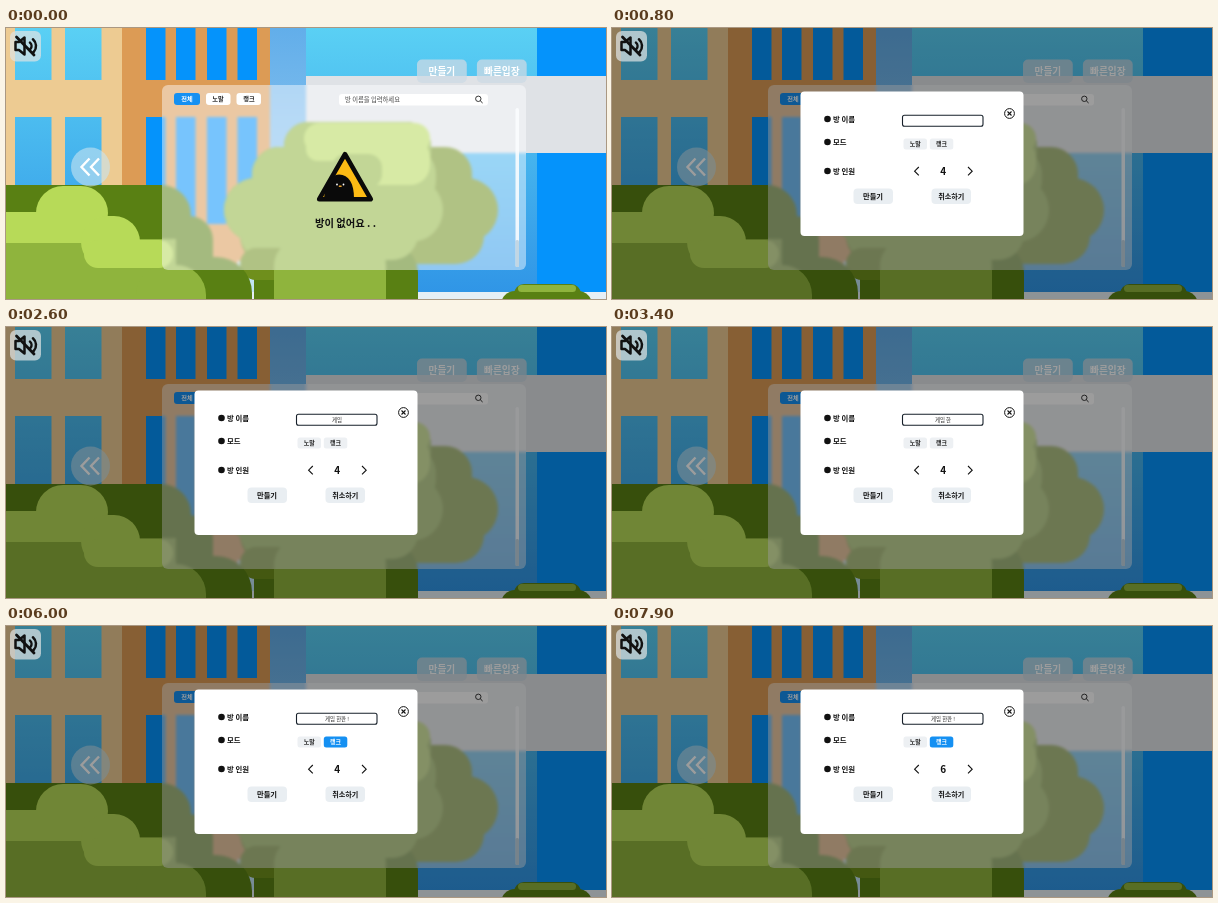
An HTML page with a canvas that plays this animation: 600 px wide and 271 px high, repeating every 8 s.

```html
<!DOCTYPE html>
<html lang="ko">
<head>
<meta charset="utf-8">
<title>방 만들기</title>
<style>
html, body { margin: 0; width: 100%; height: 100%; overflow: hidden; background: #fff; }
canvas { display: block; width: 600px; height: 271px; }
</style>
</head>
<body>
<canvas id="stage"></canvas>
<script>
const W = 600, H = 271, LOOP = 8000;
const HOVER_AT = 400, OPEN_AT = 800, TYPE_AT = 1780, KEY_MS = 190;
const RANK_AT = 5600, FIVE_AT = 6900, SIX_AT = 7400;
const STEPS = ['', 'ㄱ', '게', '겡', '게이', '게임', '게임 ', '게임 ㅎ', '게임 하', '게임 한',
  '게임 한ㅍ', '게임 한파', '게임 한판', '게임 한판 ', '게임 한판 !'];
const BLUE = '#0593fb', DARK = '#598013', OLIVE = '#6f8f1c', MID = '#8fb43d', LIGHT = '#b7da58';
const FONT = '"Noto Sans CJK KR", "Noto Sans KR", "Noto Sans CJK", sans-serif';
const dpr = window.devicePixelRatio || 1;

function prepare(canvas) {
  canvas.width = W * dpr;
  canvas.height = H * dpr;
  const c = canvas.getContext('2d');
  c.scale(dpr, dpr);
  return c;
}

const stage = document.getElementById('stage');
const ctx = prepare(stage);
const layer = () => document.createElement('canvas');

// Shapes take left, top, right, bottom.
function box(c, x, y, r, b, fill, rad = 0) {
  c.fillStyle = fill;
  c.beginPath();
  c.roundRect(x, y, r - x, b - y, rad);
  c.fill();
}

function disc(c, x, y, r, fill) {
  c.fillStyle = fill;
  c.beginPath();
  c.arc(x, y, r, 0, Math.PI * 2);
  c.fill();
}

function ring(c, x, y, r, color, width) {
  c.strokeStyle = color;
  c.lineWidth = width;
  c.beginPath();
  c.arc(x, y, r, 0, Math.PI * 2);
  c.stroke();
}

function line(c, pts, color, width) {
  c.strokeStyle = color;
  c.lineWidth = width;
  c.beginPath();
  pts.forEach(([x, y], i) => i ? c.lineTo(x, y) : c.moveTo(x, y));
  c.stroke();
}

function text(c, str, x, y, size, color, weight = 700, align = 'center') {
  c.font = `${weight} ${size}px ${FONT}`;
  c.textAlign = align;
  c.fillStyle = color;
  c.fillText(str, x, y + size * 0.36);
}

function fade(c, y0, y1, from, to) {
  const g = c.createLinearGradient(0, y0, 0, y1);
  g.addColorStop(0, from);
  g.addColorStop(1, to);
  return g;
}

function drawBuildings(c) {
  const sky = fade(c, 0, H, '#5ad0f4', '#2f94e6');
  box(c, 0, 0, W, H, sky);
  box(c, 0, 0, 116, H, '#edcb92');
  box(c, 116, 0, 264, H, '#dc9b55');
  for (const x of [9, 59]) {
    box(c, x, 0, x + 36.5, 52, sky);
    box(c, x, 89, x + 36.5, 170, sky);
  }
  for (const x of [140, 170, 201, 231.5]) {
    box(c, x, 0, x + 19.5, 52, BLUE);
    box(c, x, 89, x + 19.5, 196, BLUE);
    box(c, x, 233, x + 19.5, H, '#c2e4f5');
  }
  box(c, 264, 0, 300, H, fade(c, 0, H, '#62aeea', '#a9d4f2'));
  box(c, 531, 0, W, H, BLUE);
  box(c, 300, 48, W, 125, '#dfe2e6');
  box(c, 228, 264, W, H, '#e6eff5');
}

function drawTree(c) {
  box(c, 278, 94, 425, 150, OLIVE, 24);
  box(c, 246, 119, 466, 190, OLIVE, 27);
  box(c, 218, 150, 492, 214, OLIVE, 32);
  box(c, 234, 180, 478, 236, OLIVE, 28);
  box(c, 248, 215, 412, 300, DARK, 30);
  box(c, 278, 94, 425, 150, MID, 24);
  box(c, 246, 119, 430, 180, MID, 27);
  box(c, 218, 150, 437, 214, MID, 32);
  box(c, 234, 180, 412, 232, MID, 26);
  box(c, 234, 220, 311, 252, OLIVE, 16);
  box(c, 268, 210, 380, 300, MID, 28);
  box(c, 298, 95, 424, 126, LIGHT, 16);
  box(c, 300, 108, 352, 133, LIGHT, 12);
  box(c, 345, 110, 424, 157, LIGHT, 20);
  box(c, 326, 126, 376, 160, MID, 14);
}

function drawBushes(c) {
  box(c, 0, 157, 185, H, DARK, [0, 30, 0, 0]);
  box(c, 130, 188, 207, H, DARK, [0, 24, 0, 0]);
  box(c, 150, 229, 246, 310, DARK, 36);
  box(c, 0, 211, 170, H, MID);
  box(c, 130, 237, 200, 300, MID, 30);
  box(c, 30, 158, 102, 212, LIGHT, 28);
  box(c, 0, 184, 100, 215, LIGHT, [0, 0, 0, 0]);
  box(c, 75, 188, 134, 240, LIGHT, 26);
  box(c, 78, 212, 167, 240, LIGHT, 14);
  box(c, 495, 263, 586, 300, DARK, 14);
  box(c, 508, 256, 575, 290, DARK, 10);
  box(c, 512, 257, 570, 264, MID, 4);
}

function drawWarning(c) {
  c.lineJoin = 'round';
  c.beginPath();
  c.moveTo(339, 126.2);
  c.lineTo(364.8, 171.2);
  c.lineTo(313.2, 171.2);
  c.closePath();
  c.fillStyle = '#fdbb14';
  c.fill();
  c.strokeStyle = '#0a0a0a';
  c.lineWidth = 4.6;
  c.stroke();
  c.lineJoin = 'miter';
  c.fillStyle = '#0a0a0a';
  c.beginPath();
  c.moveTo(318, 171);
  c.bezierCurveTo(319, 156, 324, 147, 333, 146.5);
  c.bezierCurveTo(343, 147, 348, 155, 348, 171);
  c.fill();
  disc(c, 331, 156.5, 0.9, '#fff');
  disc(c, 337.5, 156.5, 0.9, '#fff');
  box(c, 332.7, 157.6, 335.8, 159, '#eda32a', 0.7);
}

function lobbyButton(c, label, x, fill) {
  box(c, x, 31.5, x + 49.8, 55, fill, 5);
  text(c, label, x + 24.9, 43.5, 9.7, '#fff', 900);
}

function drawLobby(c, scene) {
  c.drawImage(scene, 0, 0, W, H);
  c.save();
  c.beginPath();
  c.roundRect(156, 57, 364, 185, 6);
  c.clip();
  c.filter = `blur(${1.4 * dpr}px)`;
  c.drawImage(scene, 0, 0, W, H);
  c.filter = 'none';
  box(c, 156, 57, 520, 242, 'rgba(252,253,255,.46)');
  c.restore();

  box(c, 168, 65, 194, 77, '#1590f2', 3);
  box(c, 200, 65, 224.5, 77, '#fff', 3);
  box(c, 230.5, 65, 255, 77, '#fff', 3);
  text(c, '전체', 181, 71, 6.2, '#fff');
  text(c, '노말', 212, 71, 6.2, '#222');
  text(c, '랭크', 243, 71, 6.2, '#222');
  box(c, 333, 66, 482, 77.5, '#fff', 3);
  text(c, '방 이름을 입력하세요', 339, 71.5, 6.3, '#444', 400, 'left');
  ring(c, 472.3, 70.8, 2.7, '#222', 0.9);
  line(c, [[474.3, 72.8], [476.6, 75]], '#222', 1);

  box(c, 509.5, 80, 513, 239, 'rgba(250,252,254,.9)', 1.5);
  box(c, 509.5, 212, 513, 239, 'rgba(175,200,215,.7)', 1.5);
  drawWarning(c);
  text(c, '방이 없어요 . .', 339.5, 195.5, 10.3, '#111', 900);

  lobbyButton(c, '빠른입장', 470.9, 'rgba(205,218,228,.75)');

  disc(c, 84.5, 139, 19.5, 'rgba(200,228,242,.6)');
  for (const x of [75.5, 85]) line(c, [[x + 8, 130.5], [x, 139], [x + 8, 147.5]], '#fff', 2.4);
}

function drawMute(c) {
  box(c, 4, 3, 35, 33.5, 'rgba(222,226,226,.72)', 6);
  c.lineJoin = c.lineCap = 'round';
  line(c, [[9.5, 14], [13, 14], [18.5, 9.5], [18.5, 26.5], [13, 22], [9.5, 22], [9.5, 14]], '#111', 2.5);
  for (const r of [4.5, 9]) {
    c.beginPath();
    c.arc(21, 18, r, -0.85, 0.85);
    c.stroke();
  }
  line(c, [[10.5, 9], [28, 27]], '#111', 2.8);
  c.lineJoin = 'miter';
  c.lineCap = 'butt';
}

function option(c, label, x, on) {
  box(c, x, 110.5, x + 23.5, 121.5, on ? '#1590f2' : '#edf0f3', 2.5);
  text(c, label, x + 11.7, 116, 6, on ? '#fff' : '#222');
}

function drawModal(c, t) {
  box(c, 0, 0, W, H, 'rgba(0,0,0,.39)');
  box(c, 188.5, 63.5, 411.5, 208, '#fff', 4);

  ring(c, 397.5, 85.5, 4.9, '#111', 1);
  line(c, [[395.5, 83.5], [399.5, 87.5]], '#111', 1.1);
  line(c, [[399.5, 83.5], [395.5, 87.5]], '#111', 1.1);

  [['방 이름', 91], ['모드', 114], ['방 인원', 143]].forEach(([label, y]) => {
    disc(c, 215.5, y, 3.3, '#111');
    text(c, label, 221, y, 7.4, '#111', 700, 'left');
  });

  c.strokeStyle = '#17202a';
  c.lineWidth = 1.1;
  c.beginPath();
  c.roundRect(290.5, 87.3, 80.5, 10.9, 2);
  c.stroke();
  const keys = Math.floor((t - TYPE_AT) / KEY_MS) + 1;
  text(c, STEPS[Math.max(0, Math.min(STEPS.length - 1, keys))], 331, 92.8, 5.4, '#222', 500);

  option(c, '노말', 291.5, false);
  option(c, '랭크', 317.8, t >= RANK_AT);

  line(c, [[306.8, 139], [302.6, 143.2], [306.8, 147.4]], '#111', 1.1);
  line(c, [[356, 139], [360.2, 143.2], [356, 147.4]], '#111', 1.1);
  const count = t < FIVE_AT ? '4' : t < SIX_AT ? '5' : '6';
  text(c, count, 331.3, 143.2, 10, '#111');

  box(c, 241.5, 160.5, 281, 176, '#e9eef2', 4);
  box(c, 319.5, 160.5, 359, 176, '#e9eef2', 4);
  text(c, '만들기', 261, 168, 7.3, '#111');
  text(c, '취소하기', 339.3, 168, 7.1, '#111');
}

const scene = layer(), lobby = layer();
const sceneCtx = prepare(scene);
drawBuildings(sceneCtx);
drawTree(sceneCtx);
drawBushes(sceneCtx);
drawLobby(prepare(lobby), scene);

const start = performance.now();
function frame() {
  const t = (performance.now() - start) % LOOP;
  const hover = t >= HOVER_AT && t < OPEN_AT;
  ctx.drawImage(lobby, 0, 0, W, H);
  lobbyButton(ctx, '만들기', 411, hover ? 'rgba(140,212,240,.92)' : 'rgba(205,218,228,.75)');
  if (t >= OPEN_AT) drawModal(ctx, t);
  drawMute(ctx);
  requestAnimationFrame(frame);
}
frame();
</script>
</body>
</html>
```
